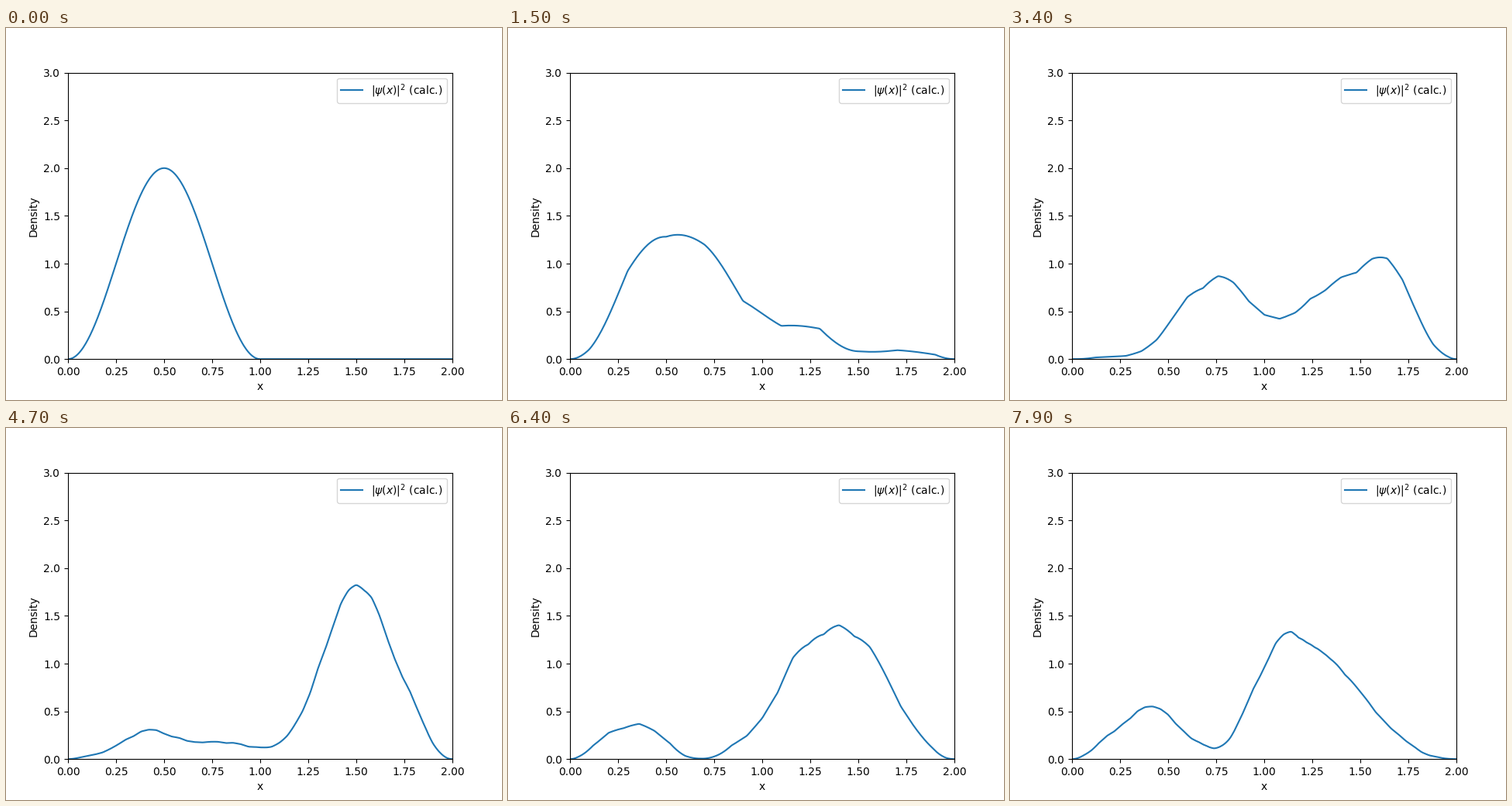
Animation, 640 px wide and 480 px high, one loop 8000 ms. Source, as a matplotlib script:

```python
import numpy as np
import matplotlib.pyplot as plt
from matplotlib.animation import FuncAnimation

# A particle in the ground state of a box of width 1, released into a box of width 2
FRAMES = 80
INTERVAL = 100
REVIVAL = 400  # frames until the wave function returns to its start
MODES = 200

x = np.linspace(0, 2, 501)
n = np.arange(1, MODES + 1)


def overlaps(n):
    """Coefficients of sqrt(2) sin(pi x) on [0, 1] in the wide box's modes."""
    c = np.zeros(len(n))
    odd = n % 2 == 1
    m = n[odd]
    c[odd] = 4 * np.sqrt(2) * np.sin(m * np.pi / 2) / (np.pi * (4 - m**2))
    c[n == 2] = 1 / np.sqrt(2)
    return c


coef = overlaps(n)
modes = np.sin(np.outer(x, n) * np.pi / 2)


def density(frame):
    turns = (n**2 * frame % REVIVAL) / REVIVAL
    psi = modes @ (coef * np.exp(-2j * np.pi * turns))
    return np.abs(psi) ** 2


fig, ax = plt.subplots(figsize=(6.4, 4.8), dpi=100)
line, = ax.plot(x, density(0), label=r"$|\psi(x)|^2$ (calc.)")
ax.set_xlim(0, 2)
ax.set_ylim(0, 3)
ax.set_xlabel("x")
ax.set_ylabel("Density")
ax.legend(loc="upper right")


def update(frame):
    line.set_ydata(density(frame))
    return line,


anim = FuncAnimation(fig, update, frames=FRAMES, interval=INTERVAL,
                     repeat=True, repeat_delay=0)
plt.show()
```
